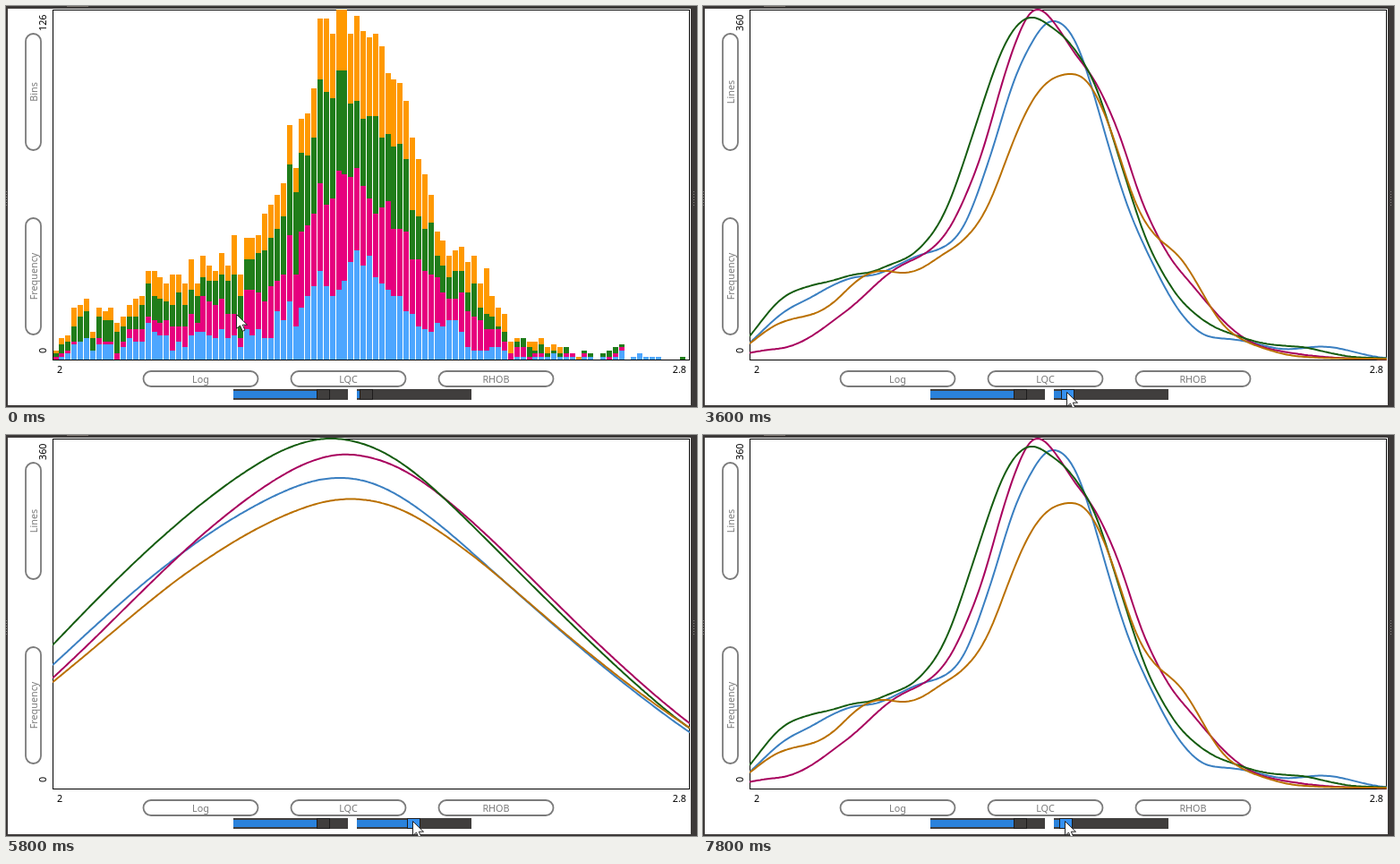
An HTML page for the animation above (8000 ms loop, 772 px wide and 448 px high).

```html
<!DOCTYPE html>
<html lang="en">
<head>
<meta charset="utf-8">
<title>Histogram smoothing</title>
<style>
html, body { margin: 0; width: 100%; height: 100%; overflow: hidden; background: #fff; }
svg { display: block; width: 772px; height: 448px; }
text { font: 10.8px "Noto Sans", "Open Sans", sans-serif; }
</style>
</head>
<body>
<svg id="stage" viewBox="0 0 772 448"></svg>
<script>
const LOOP = 8000, STEP = 200;
const LEFT = 52, RIGHT = 764, TOP = 4, BASE = 395, HEIGHT = BASE - TOP;
const BIN = 6.87, SAMPLE = 2, TRACK = 392;
const stage = document.getElementById('stage');

function add(tag, attrs, parent = stage) {
  const node = document.createElementNS('http://www.w3.org/2000/svg', tag);
  set(node, attrs);
  return parent.appendChild(node);
}
function set(node, attrs) {
  for (const key in attrs) node.setAttribute(key, attrs[key]);
}
const show = (node, on) => set(node, { visibility: on ? 'visible' : 'hidden' });
const box = (x, y, width, height, fill, parent) => add('rect', { x, y, width, height, fill }, parent);
function label(x, y, str, fill, anchor, upright) {
  const node = add('text', { x, y, fill, 'text-anchor': anchor });
  if (upright) set(node, { transform: `rotate(-90 ${x} ${y})` });
  node.textContent = str;
  return node;
}

// Monotone cubic through [x, y] points, flat beyond both ends.
function spline(...points) {
  const last = points.length - 1;
  const slope = i => (points[i + 1][1] - points[i][1]) / (points[i + 1][0] - points[i][0]);
  const tangent = i => {
    if (i === 0 || i === last) return slope(Math.min(i, last - 1));
    const a = slope(i - 1), b = slope(i);
    return a * b <= 0 ? 0 : 2 * a * b / (a + b);
  };
  return at => {
    if (at <= points[0][0]) return points[0][1];
    if (at >= points[last][0]) return points[last][1];
    const i = points.findIndex(p => p[0] >= at) - 1;
    const [x0, y0] = points[i], [x1, y1] = points[i + 1];
    const h = x1 - x0, u = (at - x0) / h, v = 1 - u;
    return v * v * (1 + 2 * u) * y0 + u * u * (3 - 2 * u) * y1
      + h * u * v * (v * tangent(i) - u * tangent(i + 1));
  };
}

// Turning points of the four distributions; bars and every smoothing follow from them.
const groups = [
  { bar: '#4da6ff', line: '#3a7fc1', curve: spline([52, 387], [98, 340], [118, 348], [170, 307], [190, 336],
    [212, 312], [250, 293], [275, 305], [295, 287], [312, 239], [322, 234], [347, 102], [366, 133], [388, 60],
    [447, 174], [475, 292], [494, 273], [528, 371], [545, 358], [567, 388], [598, 369], [640, 391], [690, 380], [745, 394]) },
  { bar: '#e6007e', line: '#a8005e', curve: spline([52, 387], [72, 378], [93, 393], [150, 355], [166, 354],
    [192, 327], [228, 301], [253, 310], [290, 256], [309, 238], [334, 134], [346, 137], [371, 4], [397, 128],
    [413, 142], [427, 104], [454, 172], [464, 160], [492, 290], [512, 284], [528, 315], [568, 345], [590, 374], [620, 384], [700, 394]) },
  { bar: '#207d1a', line: '#155c10', curve: spline([52, 386], [90, 324], [115, 335], [133, 333], [162, 305],
    [183, 339], [207, 290], [229, 328], [251, 271], [274, 295], [302, 165], [326, 145], [361, 46], [391, 127],
    [405, 95], [442, 138], [460, 212], [471, 217], [496, 316], [514, 314], [540, 356], [600, 374], [653, 387], [668, 375], [695, 393]) },
  { bar: '#ff9900', line: '#ba7000', curve: spline([52, 388], [80, 353], [102, 360], [150, 348], [178, 313],
    [204, 295], [221, 343], [262, 292], [280, 309], [297, 275], [319, 284], [348, 178], [368, 142], [396, 147],
    [428, 117], [445, 161], [456, 167], [488, 298], [500, 306], [528, 271], [560, 350], [577, 379], [595, 370], [628, 389], [690, 394]) }
];
for (const group of groups) {
  group.density = [];
  for (let x = LEFT; x <= RIGHT; x += SAMPLE) group.density.push(BASE - group.curve(x));
}

// Triangular kernel with empty space beyond both ends.
function smooth(values, reach) {
  const n = Math.ceil(reach / SAMPLE);
  return values.map((_, i) => {
    let sum = 0;
    const end = Math.min(values.length - 1, i + n);
    for (let j = Math.max(0, i - n); j <= end; j++) {
      sum += values[j] * Math.max(0, 1 - Math.abs(i - j) * SAMPLE / reach);
    }
    return sum;
  });
}

let seed = 11;
function random() {
  seed = (seed * 16807) % 2147483647;
  return seed / 2147483647;
}
const noise = () => (random() + random() + random() - 1.5) * 2;

// Window frame
box(0, 0, 772, 448, '#3c3938');
box(2, 3, 763, 443, '#fff');
box(68, 0, 24, 1, '#77706c');
for (let y = 207; y < 223; y += 3) {
  box(0, y, 1, 1, '#8a8684');
  box(768, y, 1, 1, '#8a8684');
}
add('rect', { x: 52.5, y: 4.5, width: 711, height: 391, fill: 'none', stroke: '#000' });

// Stacked bars: whole counts scattered around each distribution
const bars = add('g', { 'shape-rendering': 'crispEdges' });
const stacks = Array.from({ length: 103 }, (_, i) => groups.map(({ curve }) => {
  const mean = (BASE - curve(LEFT + (i + 0.5) * BIN)) * 0.09;
  return Math.max(0, Math.round(mean + noise() * Math.sqrt(mean) * 0.7));
}));
const total = stack => stack.reduce((a, b) => a + b);
const unit = HEIGHT / Math.max(...stacks.map(total));
stacks.forEach((stack, i) => {
  let count = 0;
  stack.forEach((part, k) => {
    const low = Math.round(count * unit), high = Math.round((count += part) * unit);
    if (part) box(Math.round(LEFT + 0.6 + i * BIN), BASE - high, 6, high - low, groups[k].bar, bars);
  });
});

// Smoothed lines
const clip = add('clipPath', { id: 'plot' });
box(LEFT, TOP - 1, RIGHT - LEFT, HEIGHT + 2, '#000', clip);
const lines = add('g', { fill: 'none', 'stroke-width': 2, 'stroke-linejoin': 'round', 'clip-path': 'url(#plot)' });
for (const group of groups) group.path = add('path', { stroke: group.line }, lines);

// Buttons and axis labels
const GRAY = '#7b7b7b';
const button = (x, y, width, height) =>
  add('rect', { x, y, width, height, rx: 8.5, fill: '#fff', stroke: GRAY, 'stroke-width': 1.8 });
['Log', 'LQC', 'RHOB'].forEach((name, i) => {
  button(153.5 + 165 * i, 408, 128, 17);
  label(217.5 + 165 * i, 421, name, GRAY, 'middle');
});
button(22, 31, 17, 130);
button(22, 237, 17, 130);
const modeLabel = label(35, 96, 'Bins', GRAY, 'middle', true);
label(35, 302, 'Frequency', GRAY, 'middle', true);
const maxLabel = label(45, 9.5, '126', '#000', 'end', true);
label(45, 385, '0', '#000', 'middle', true);
label(57, 410, '2', '#000', 'start');
label(760, 410, '2.8', '#000', 'end');

function slider(x) {
  box(x, 428, 128, 12, '#403e3d');
  const fill = box(x, 430, 0, 8, '#2a82dc');
  const thumb = add('rect', { y: 428.5, width: 14, height: 11, stroke: '#1d1c1c' });
  return (at, active) => {
    set(fill, { width: at - x });
    set(thumb, { x: at + 0.5, fill: active ? '#3590f0' : '#403e3d' });
  };
}
slider(254)(347, false);
const setSmoothing = slider(TRACK);

const ripple = add('circle', { cx: 37, cy: 97, fill: '#f03a3a' });
const cursor = add('path', {
  d: 'M0 0V16L4 12.6 6.8 18.8 9.5 17.6 6.8 11.7H12Z', fill: '#fff', stroke: '#222', 'stroke-width': 1
});

const thumbAt = spline([3000, 395], [3600, 400], [4400, 420], [5200, 453], [5600, 457], [6200, 418], [7000, 404], [7800, 398]);
const approachX = spline([0, 257], [200, 215], [600, 3], [800, 37]);
const approachY = spline([0, 344], [200, 290], [600, 58], [800, 97]);

function pointer(t, thumb) {
  if (t < 1000) return [approachX(t), approachY(t)];
  if (t > 3000) return [thumb + 6, 431];
  const u = Math.min(1, Math.max(0, (t - 1800) / 1200)), e = u * u * (3 - 2 * u);
  return [37 + 364 * e, 98 + 333 * e];
}

// The slider moves in steps of four; its first step is the unsmoothed state.
function drawCurves(thumb) {
  const step = Math.max(1, Math.round((thumb - TRACK) / 4));
  const reach = Math.max(SAMPLE, 31.2 * Math.sqrt(step * step - 1));
  const results = groups.map(group => smooth(group.density, reach));
  const scale = HEIGHT / Math.max(...results.flat());
  groups.forEach(({ path }, k) => {
    const points = results[k].map((v, i) => `${LEFT + i * SAMPLE} ${(BASE - v * scale).toFixed(1)}`);
    set(path, { d: 'M' + points.join('L') });
  });
}

function render(t) {
  const asLines = t >= 1200, dragging = t >= 3200, thumb = Math.round(thumbAt(t));
  show(bars, !asLines);
  show(lines, asLines);
  if (asLines) drawCurves(thumb);
  modeLabel.textContent = asLines ? 'Lines' : 'Bins';
  maxLabel.textContent = dragging ? '360' : '126';
  setSmoothing(thumb, dragging);
  show(ripple, t >= 1200 && t < 1600);
  set(ripple, t < 1400 ? { r: 8.5, opacity: 0.75 } : { r: 21, opacity: 0.2 });
  const [x, y] = pointer(t, thumb).map(Math.round);
  set(cursor, { transform: `translate(${x + 0.5} ${y + 0.5})` });
}

const start = performance.now();
let shown = -1;
function tick() {
  const t = Math.floor((performance.now() - start) % LOOP / STEP) * STEP;
  if (t !== shown) render(shown = t);
  requestAnimationFrame(tick);
}
tick();
</script>
</body>
</html>
```
